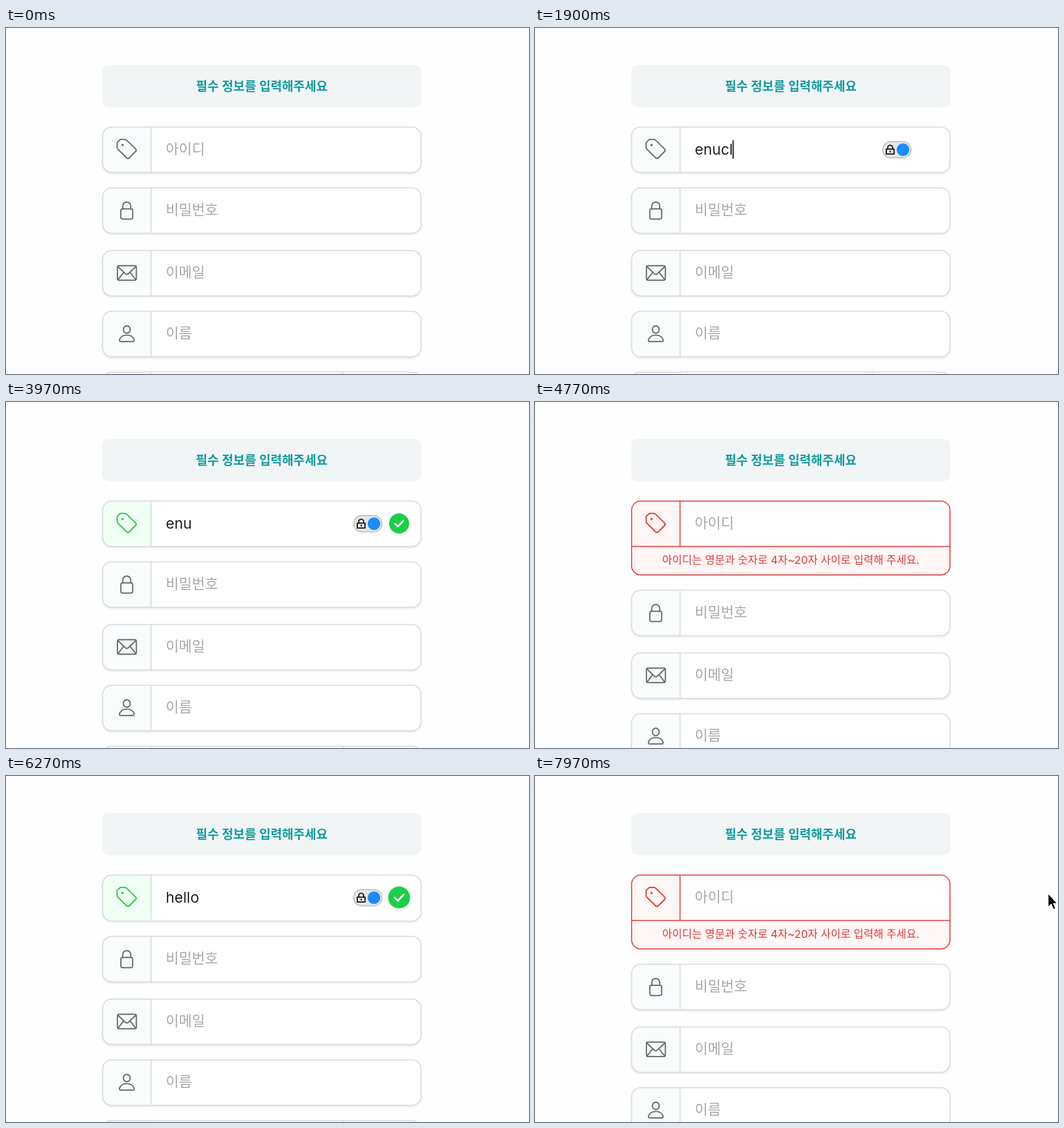
An HTML page that plays this animation: 920 px wide and 609 px high, repeating every 8 s.

```html
<!DOCTYPE html>
<html lang="ko">
<head>
<meta charset="utf-8">
<style>
  html, body { margin: 0; width: 100%; height: 100%; overflow: hidden; background: #fefefe; }
  svg { display: block; width: 100%; height: 100%; }
  text { font-family: Inter, "Noto Sans CJK KR", "Noto Sans CJK", sans-serif; }
  .hint { font-size: 25px; fill: #a8a8a8; }
  .icon { fill: none; stroke: #6c6c6c; stroke-width: 2.2; stroke-linecap: round; stroke-linejoin: round; }
  .cell { fill: #f8fcfd; }
  .line { fill: none; stroke: #d9dadb; stroke-width: 1.7; }
  .box { fill: #fff; filter: drop-shadow(0 2px 2px rgba(0, 0, 0, .11)); }
</style>
</head>
<body>
<svg viewBox="0 0 920 609" xmlns="http://www.w3.org/2000/svg">
  <rect x="169" y="65" width="562" height="74.5" rx="12" fill="#f1f5f6"/>
  <text x="450" y="110.3" text-anchor="middle" font-size="21.8" font-weight="600" fill="#109b9f">필수 정보를 입력해주세요</text>

  <g id="rest"></g>

  <g id="first">
    <rect id="box" class="box" x="170" y="174.3" width="560" height="80" rx="16"/>
    <path id="cell" class="cell" d="M255 174.3H186a16 16 0 0 0-16 16V254.3H255z"/>
    <clipPath id="fold"><rect id="foldBox" x="170" y="174.3" width="560" height="80" rx="16"/></clipPath>
    <g id="alert" clip-path="url(#fold)">
      <rect x="170" y="254.3" width="560" height="51" fill="#fff6f5"/>
      <text id="message" x="450" y="285" text-anchor="middle" font-size="19" fill="#dc3c3a">아이디는 영문과 숫자로 4자~20자 사이로 입력해 주세요.</text>
      <path id="seam" class="line" d="M170 254.3H730"/>
    </g>
    <path id="divider" class="line" d="M255.2 174.3V254.3"/>
    <rect id="edge" class="line" x="170" y="174.3" width="560" height="80" rx="16"/>
    <g id="tag" class="icon">
      <path d="M195.5 210V201.500L201 196.200H209Q211 196.200 212.500 197.700L228 213Q230 215.200 228 217.400L217 228.400Q214.500 230.800 212 228.400L197 213.500Q195.500 212 195.500 210Z"/>
      <circle id="hole" cx="205" cy="206" r="2" stroke="none"/>
    </g>
    <text id="hint" class="hint" x="281" y="222">아이디</text>
    <text id="typed" x="281" y="223.400" font-size="26" fill="#222"></text>
    <rect id="caret" y="197.500" width="2" height="32.500" fill="#111"/>
    <g id="badge">
      <rect x="611.500" y="199.800" width="50" height="29" rx="14.500" fill="#e5e5e5" stroke="#b9b9b9" stroke-width="1.500"/>
      <path d="M620.500 213v-2.500a4.300 4.300 0 0 1 8.600 0v2.500M618 213.300h13.600v8.400h-13.600zM624.800 216v3" fill="none" stroke="#111" stroke-width="2.100" stroke-linejoin="round"/>
      <circle cx="647.300" cy="214.200" r="11" fill="#1a8cff"/>
    </g>
    <g id="check">
      <circle r="17.700" fill="#1bcf48"/>
      <path d="M-7 .5L-2 5.300L7.300-4.800" fill="none" stroke="#fff" stroke-width="3" stroke-linecap="round" stroke-linejoin="round"/>
    </g>
  </g>

  <path id="arrow" d="M0 0V24.500L5.500 19.500L9.500 28.500L13.500 26.800L9.700 18H16.500Z" fill="#000" stroke="#fff" stroke-width="1.500"/>
  <path id="beam" d="M-4-12Q0-12 0-9Q0-12 4-12M0-9V9M-4 12Q0 12 0 9Q0 12 4 12" fill="none" stroke="#222" stroke-width="1.800"/>
</svg>
<script>
const LOOP = 8000;
const $ = id => document.getElementById(id);
const set = (id, attrs) => { for (const k in attrs) $(id).setAttribute(k, attrs[k]); };
const show = (id, on) => { $(id).style.display = on ? '' : 'none'; };

const GREY = [108, 108, 108], GREEN = [36, 203, 72], RED = [222, 62, 58], LINE = [217, 218, 219];
const PALE = [248, 252, 253], MINT = [240, 255, 244], ROSE = [255, 247, 245];

// Remaining fields
const fields = [
  [281.3, '비밀번호', '<rect x="202" y="37" width="20.800" height="18" rx="3"/><path d="M205.400 37v-5a7 7 0 0 1 14 0v5"/>'],
  [391.6, '이메일', '<rect x="196" y="26.700" width="33.300" height="25.600" rx="3"/><path d="M197 28.500L210 41q2.500 2 5 0L228.300 28.500M197.200 51L206.500 39M228 51L218.700 39"/>'],
  [498.7, '이름', '<ellipse cx="212.500" cy="32" rx="6" ry="6.500"/><path d="M202 53.200H223Q226 53.200 225.300 50Q222.500 41.800 212.500 41.800Q202.500 41.800 199.700 50Q199 53.200 202 53.200Z"/>'],
  [605.6, '', '<path class="line" d="M593 0V80"/>']
];
$('rest').innerHTML = fields.map(([y, label, icon]) => `<g transform="translate(0 ${y})">
  <rect class="box" x="170" width="560" height="80" rx="16"/>
  <path class="cell" d="M255 0H186a16 16 0 0 0-16 16V64a16 16 0 0 0 16 16H255z"/>
  <path class="line" d="M255.200 0V80"/>
  <rect class="line" x="170" width="560" height="80" rx="16"/>
  <g class="icon">${icon}</g><text class="hint" x="281" y="47.700">${label}</text></g>`).join('');

// Timelines: [time, value] with straight lines between
const at = (t, keys) => {
  if (t <= keys[0][0]) return keys[0][1];
  for (let i = 1; i < keys.length; i++) {
    const [a, u] = keys[i - 1], [b, v] = keys[i];
    if (t < b) return u + (v - u) * (t - a) / (b - a);
  }
  return keys[keys.length - 1][1];
};
const ramp = (t, start, length) => Math.min(1, Math.max(0, (t - start) / length));
const easeInOut = k => k < .5 ? 2 * k * k : 1 - 2 * (1 - k) ** 2;
const mix = (a, b, k) => `rgb(${a.map((v, i) => Math.round(v + (b[i] - v) * k))})`;

const VALID = [2450, 6140], INVALID = [4470, 7470];
const words = [
  { text: 'enuclovar', down: [1270, 1430, 1580, 1720, 1870, 2100, 2200, 2930, 3070],
    up: [3230, 3630, 3710, 3790, 3870, 3950, 4040, 4130, 4220] },
  { text: 'hello', down: [5210, 5330, 5450, 5570, 5730], up: [6870, 6960, 7050, 7140, 7220] }
];
const focusSpans = [[870, 4700], [5080, 7730]];
const beats = [...focusSpans.map(s => s[0]), ...words.flatMap(w => [...w.down, ...w.up])];
const closing = [[6140, 50], [6170, 30], [6200, 14], [6230, 5], [6270, 1], [6330, 0]];
const pop = [[0, 0], [60, .6], [130, 1.09], [230, .97], [340, 1.01], [450, 1]];

const paths = [
  { span: [30, 1100], x: [[30, 856], [230, 660], [480, 500], [700, 455], [870, 450], [970, 610], [1070, 880], [1100, 925]],
    y: [[30, 300], [480, 224], [870, 214], [1100, 222]] },
  { span: [4970, 5210], x: [[4970, 750], [5080, 500], [5210, 470]], y: [[4970, 236], [5080, 215]] },
  { span: [7570, LOOP], x: [[7570, 560], [7670, 763], [7800, 860], [7930, 902.500]], y: [[7570, 216], [7800, 211], [7930, 206.500]] }
];

// Blend through a list of states, each [start, duration, colour]
const blend = (t, base, states) => {
  let from = base, to = base, k = 1;
  for (const [start, length, colour] of states) {
    if (t < start) break;
    from = to; to = colour; k = ramp(t, start, length);
  }
  return mix(from, to, k);
};
const states = (good, bad, length) => [
  [VALID[0], length, good], [INVALID[0], length, bad], [VALID[1], length, good], [INVALID[1], length, bad]
];

function draw(t) {
  const opening = INVALID.map(s => 50 * easeInOut(ramp(t, s, 200)));
  const gap = t < VALID[1] ? opening[0] : t < INVALID[1] ? at(t, closing) : opening[1];
  const red = at(t, [[4470, 0], [4560, 1], [6140, 1], [6230, 0], [7470, 0], [7560, 1]]);
  const edge = mix(LINE, RED, red);

  for (const id of ['box', 'edge', 'foldBox']) set(id, { height: 80 + gap });
  set('rest', { transform: `translate(0 ${gap})` });
  $('edge').style.stroke = edge;
  $('divider').style.stroke = mix(LINE, RED, Math.min(1, red * 2));
  $('seam').style.stroke = mix(LINE, RED, red);
  set('seam', { opacity: Math.min(1, .4 + gap / 50) });
  set('message', { opacity: ramp(gap, 8, 40) });
  show('alert', gap > .5 && red > 0);

  // The cell has a square lower corner only while the alert is open
  set('cell', { d: gap > 2 ? 'M255 174.300H186a16 16 0 0 0-16 16V254.300H255z'
    : 'M255 174.300H186a16 16 0 0 0-16 16v48a16 16 0 0 0 16 16H255z' });
  $('cell').style.fill = blend(t, PALE, states(MINT, ROSE, 50));
  const tint = blend(t, GREY, states(GREEN, RED, 120));
  $('tag').style.stroke = tint;
  $('hole').style.fill = tint;
  $('hole').style.stroke = 'none';

  const word = words[t < 4900 ? 0 : 1];
  const past = list => list.filter(s => s <= t).length;
  const text = word.text.slice(0, past(word.down) - past(word.up));
  $('typed').textContent = text;
  show('hint', !text);

  const focused = focusSpans.some(([a, b]) => t >= a && t < b);
  const last = Math.max(0, ...beats.filter(s => s <= t));
  const held = t >= 3630 && t < 4220;
  show('badge', focused);
  show('caret', focused && !held && (t - last) % 1000 < 500);
  set('caret', { x: 281 + (text ? $('typed').getComputedTextLength() - .5 : 0) });

  let size = 0;
  VALID.forEach((s, i) => {
    if (t >= s && t < INVALID[i] + 50) size = at(t - s, pop) * (1 - ramp(t, INVALID[i], 50));
  });
  set('check', { transform: `translate(691.500 213.800) scale(${size})` });
  show('check', size > 0);

  const path = paths.find(p => t >= p.span[0] && t < p.span[1]);
  const x = path ? at(t, path.x) : 0, y = path ? at(t, path.y) : 0;
  const inside = x > 256 && x < 730 && y > 174 && y < 254;
  show('arrow', path && !inside);
  show('beam', path && inside);
  for (const id of ['arrow', 'beam']) set(id, { transform: `translate(${x} ${y})` });
}

const begin = performance.now();
function tick() {
  draw((performance.now() - begin) % LOOP);
  requestAnimationFrame(tick);
}
tick();
</script>
</body>
</html>
```
